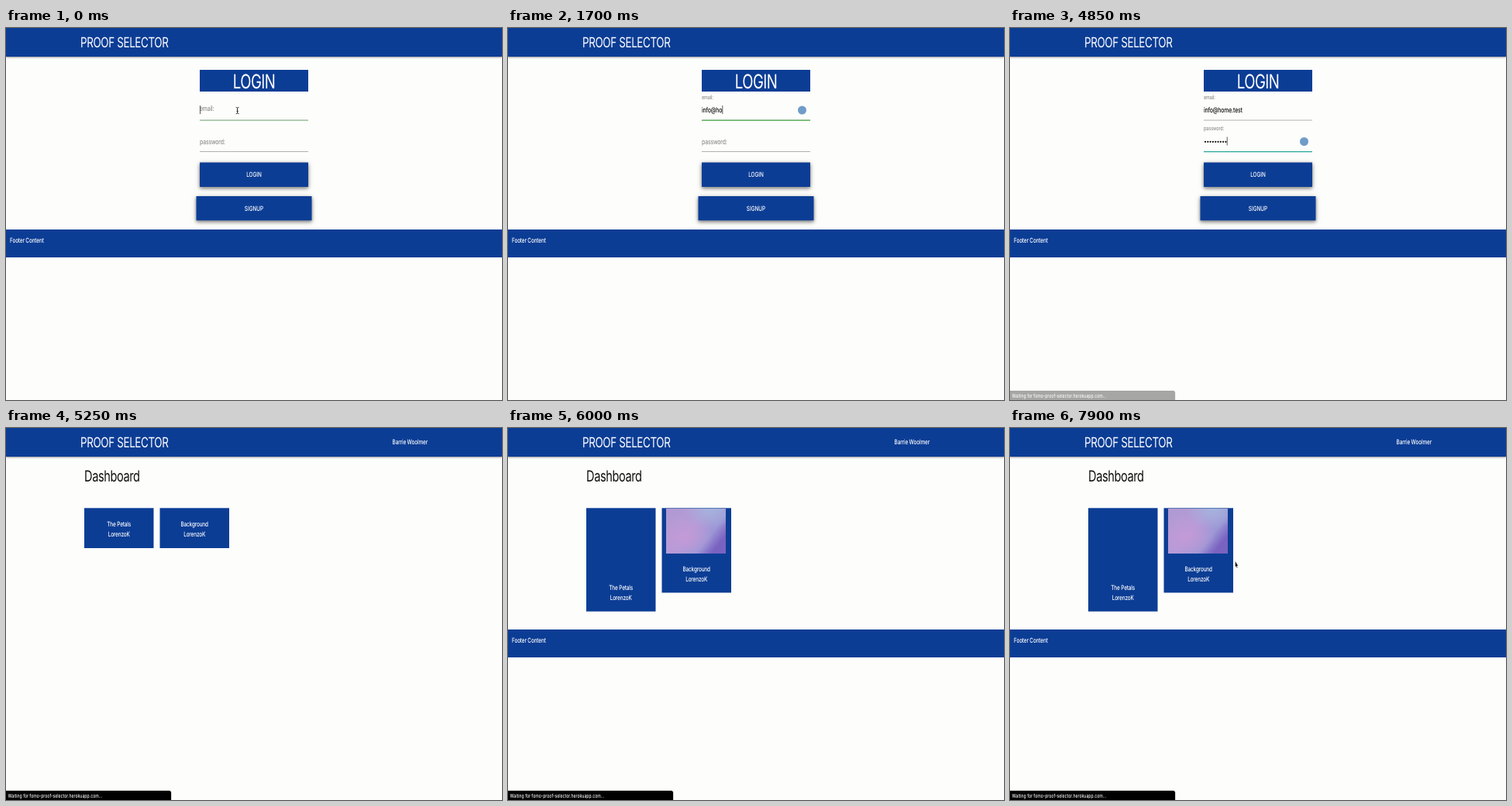
Recreate the animation shown at these times as an HTML page. Size 640 px wide and 480 px high, loop 8 s.

```html
<!DOCTYPE html>
<html lang="en">
<head>
<meta charset="utf-8">
<title>Login and dashboard</title>
<style>
  html, body { margin: 0; width: 100%; height: 100%; overflow: hidden; background: #fdfdfb; }
  svg { display: block; width: 100%; height: 100%; }
  text { font-family: Inter, Roboto, sans-serif; letter-spacing: -.027em; white-space: pre; text-rendering: geometricPrecision; }
  .small { font-weight: 500; letter-spacing: -.02em; }
  .wide { font-weight: 500; letter-spacing: 0; }
  .blue { fill: #0c3d95; }
  .raised { filter: drop-shadow(0 2px 2px #0006) drop-shadow(0 1px 3px #0003); }
  .bar { filter: drop-shadow(0 1px 1px #0006); }
</style>
</head>
<body>
<svg id="stage" viewBox="0 0 640 480"></svg>
<script>
const LOOP = 8000;
const SQUEEZE = .737; // the page is shown narrower than it is tall
const EMAIL = 'info@home.test';
const emailKeys = [900, 1000, 1100, 1200, 1400, 1550, 1650, 1800, 1950, 2050, 2200, 2250, 2350, 2400];
const passKeys = [2800, 2900, 3000, 3125, 3400, 3800, 4000, 4300, 4350];
const DOT = 3.3;
const TAB = 2600, STATUS = 4850, DASH = 5250, FIRST_GROWS = 5400, PHOTO = 6000;
// time, x, y of the arrow
const route = [[6650, 298, 106], [6800, 263.5, 82], [7120, 345, 53], [7450, 462, 50], [7680, 405, 92], [7900, 290.5, 171.5]];

const place = (x, y, k = 1) => `translate(${x} ${y}) scale(${SQUEEZE * k} ${k})`;
const text = (x, y, size, str, { fill = '#fff', anchor = 'start', id = '', cls = size < 10 ? 'small' : '' } = {}) =>
  `<text id="${id}" class="${cls}" transform="${place(x, y)}" font-size="${size}" fill="${fill}" text-anchor="${anchor}">${str}</text>`;
const centred = (x, y, size, str, cls) => text(x, y, size, str, { anchor: 'middle', cls });
const rect = (x, y, w, h, cls = 'blue', id = '') =>
  `<rect id="${id}" x="${x}" y="${y}" width="${w}" height="${h}" class="${cls}"/>`;
const button = (x, y, w, h, str) =>
  rect(x, y, w, h, 'blue raised') + centred(320, y + h / 2 + 3.2, 8.67, str, 'wide');
const field = (name, label, base, lineY, focus) =>
  text(250, base, 9.25, label, { fill: '#8f8f8f', id: name + 'Label' }) +
  `<path d="M250 ${lineY}h140" stroke="#9e9e9e" stroke-width=".8"/>` +
  `<path id="${name}Line" d="M250 ${lineY + .2}h140" stroke="${focus}" stroke-width="1.3"/>`;
const card = (x, id, title) =>
  rect(x, 103.3, 89.5, 51.7, 'blue', id) +
  `<g id="${id}Text">${centred(x + 44.7, 127.2, 8.67, title)}${centred(x + 44.7, 140.2, 8.67, 'LorenzoK')}</g>`;

const stage = document.getElementById('stage');
stage.innerHTML = `
  <defs>
    <linearGradient id="base" x2="1" y2=".6">
      <stop offset="0" stop-color="#b09ad2"/><stop offset=".5" stop-color="#b49bd8"/>
      <stop offset=".8" stop-color="#9c97d6"/><stop offset="1" stop-color="#7a62c0"/>
    </linearGradient>
    <radialGradient id="pink" cx=".3" cy=".62" r=".5">
      <stop offset="0" stop-color="#c39ad6"/><stop offset="1" stop-color="#c39ad6" stop-opacity="0"/>
    </radialGradient>
    <radialGradient id="pale" cx=".75" cy="0" r=".45">
      <stop offset="0" stop-color="#a3b4dc"/><stop offset="1" stop-color="#a3b4dc" stop-opacity="0"/>
    </radialGradient>
  </defs>
  ${rect(0, 0, 640, 37, 'blue bar')}
  ${text(96, 25, 18.2, 'PROOF SELECTOR')}
  <g id="footer">${rect(0, 260, 640, 36)}${text(5, 277, 8.67, 'Footer Content')}</g>
  <g id="login">
    ${rect(250, 54, 140, 28)}
    ${centred(320, 77.6, 25.3, 'LOGIN')}
    ${field('email', 'email:', 107.2, 119, '#4caf50')}
    ${field('pass', 'password:', 149.8, 159.5, '#26a69a')}
    ${text(250, 109.2, 9.25, '', { fill: '#111', id: 'typed' })}
    <path id="dots" stroke="#111" stroke-width="2.3" stroke-linecap="round" stroke-dasharray="0 ${DOT}"/>
    <path id="caret" d="M0 -5.5v11" stroke="#333" stroke-width=".8"/>
    <circle id="badge" cx="379.5" r="5.5" fill="#6f9cc8"/>
    ${button(250, 173.5, 140, 31.5, 'LOGIN')}
    ${button(245.5, 217, 149, 31.3, 'SIGNUP')}
    <path id="beam" d="M296.6 102.3q2 0 2 1.2v6q0 1.2 -2 1.2M300.6 102.3q-2 0 -2 1.2v6q0 1.2 2 1.2M297.6 107.5h2" fill="none" stroke="#222" stroke-width=".8"/>
  </g>
  <g id="dash">
    ${text(544, 21.3, 8.67, 'Barrie Woolmer', { anchor: 'end' })}
    ${text(101, 69, 19.8, 'Dashboard', { fill: '#111' })}
    ${card(101, 'first', 'The Petals')}
    ${card(198.5, 'second', 'Background')}
    <g id="photo">
      ${['base', 'pink', 'pale'].map(g => `<rect x="204" y="104" width="77" height="58" fill="url(#${g})"/>`).join('')}
    </g>
  </g>
  <g id="status">
    <path d="M0 468h210.5q2.5 0 2.5 2.5v9.5h-213z" class="bar"/>
    ${text(2.5, 476.5, 6.93, 'Waiting for fomo-proof-selector.herokuapp.com...', { fill: '#f4f4f4', cls: 'wide' })}
  </g>
  <path id="arrow" d="M0 0v8.4l1.3 -1.5 1 2.4 1 -.5 -1 -2.3h1.7z" fill="#111" stroke="#fff" stroke-width=".4"/>`;

const el = Object.fromEntries([...stage.querySelectorAll('[id]')].filter(n => n.id).map(n => [n.id, n]));
const show = (id, on) => el[id].setAttribute('display', on ? 'inline' : 'none');
const set = (id, name, value) => el[id].setAttribute(name, value);
const clamp = v => Math.max(0, Math.min(1, v));
const easeOut = v => 1 - (1 - clamp(v)) ** 2;
const pressed = (keys, t) => keys.filter(k => k <= t).length;

// Smooth curve through the route's points
function along(t) {
  let i = 0;
  while (i < route.length - 2 && t >= route[i + 1][0]) i++;
  const at = j => route[Math.max(0, Math.min(route.length - 1, j))];
  const [a, b, c, d] = [at(i - 1), at(i), at(i + 1), at(i + 2)];
  const u = clamp((t - b[0]) / (c[0] - b[0]));
  return [1, 2].map(k => b[k] + u / 2 * (c[k] - a[k] +
    u * (2 * a[k] - 5 * b[k] + 4 * c[k] - d[k] + u * (3 * (b[k] - c[k]) + d[k] - a[k]))));
}

const liftLabel = (id, y, rise, amount) =>
  set(id, 'transform', place(250, y - rise * amount, 1 - .2 * amount));

function drawLogin(t) {
  const onPass = t >= TAB;
  liftLabel('emailLabel', 107.2, 15.2, easeOut((t - 50) / 200));
  liftLabel('passLabel', 149.8, 17.4, easeOut((t - TAB) / 200));
  set('emailLine', 'opacity', onPass ? 1 - clamp((t - TAB) / 300) : clamp(.4 + t / 400));
  set('passLine', 'opacity', clamp((t - TAB) / 300));
  el.typed.textContent = EMAIL.slice(0, pressed(emailKeys, t));
  const n = pressed(passKeys, t);
  show('dots', n > 0);
  set('dots', 'd', `M252 146.8h${(n - 1) * DOT + .1}`);
  const x = onPass ? n * DOT : el.typed.getComputedTextLength() * SQUEEZE;
  set('caret', 'transform', `translate(${250.5 + x} ${onPass ? 146 : 105.5})`);
  show('badge', t >= 200);
  set('badge', 'cy', onPass ? 146.5 : 106);
  show('beam', t < emailKeys[0]);
}

function drawDash(t) {
  const grow = (id, by) => {
    set(id, 'height', 51.7 + by);
    set(id + 'Text', 'transform', `translate(0 ${by})`);
  };
  grow('first', t >= FIRST_GROWS ? 81.7 : 0);
  grow('second', t >= PHOTO ? 57.5 : 0);
  show('photo', t >= PHOTO);
}

function draw(now) {
  const t = now % LOOP, inside = t >= DASH;
  show('login', !inside);
  show('dash', inside);
  show('footer', !inside || t >= FIRST_GROWS);
  show('status', t >= STATUS);
  set('status', 'opacity', clamp((t - STATUS + 50) / 150));
  show('arrow', t >= route[0][0]);
  if (inside) drawDash(t); else drawLogin(t);
  set('arrow', 'transform', `translate(${along(t).join(' ')})`);
  requestAnimationFrame(draw);
}
draw(0);
</script>
</body>
</html>
```
